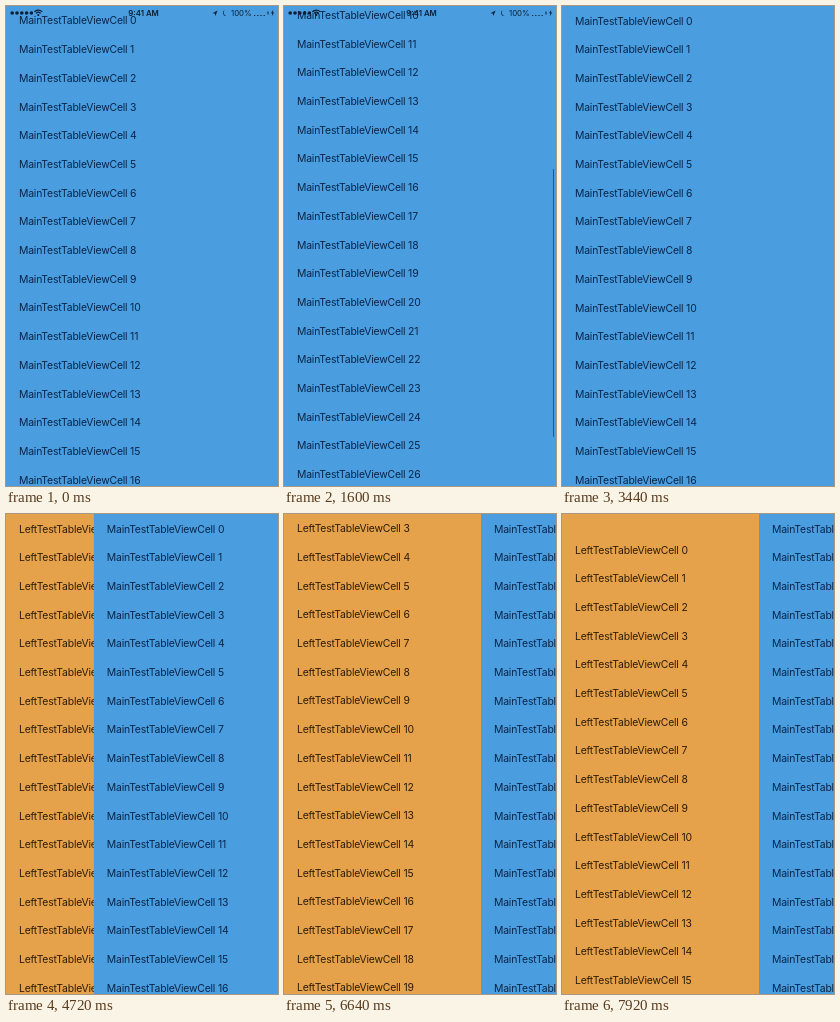
These frames come from a looping animation (272 px wide and 480 px high, 8 s). An HTML page with a canvas:

```html
<!DOCTYPE html>
<html lang="en">
<head>
<meta charset="utf-8">
<style>
html, body { margin: 0; width: 100%; height: 100%; overflow: hidden; }
canvas { display: block; width: 272px; height: 480px; }
</style>
</head>
<body>
<canvas id="stage"></canvas>
<script>
const W = 272, H = 480, ROW = 28.7, ROWS = 30, LOOP = 8000;
const FONT = 'Inter, Roboto, sans-serif';
const BLUE = '#4a9ddf', ORANGE = '#e6a24a', NAVY = '#08264a', BROWN = '#2e1d08', BLACK = '#0b1f35';
const canvas = document.getElementById('stage');
const ctx = canvas.getContext('2d');
const scale = window.devicePixelRatio || 1;
canvas.width = W * scale;
canvas.height = H * scale;

const progress = (t, start, length) => Math.max(0, Math.min(1, (t - start) / length));

// Smooth rise from 0 to 1
function ease(t, start, length) {
  const p = progress(t, start, length);
  return p * p * (3 - 2 * p);
}

// Smooth rise to 1 and back to 0
const pulse = (t, start, length) => Math.sin(Math.PI * progress(t, start, length)) ** 2;

// Fling to the bottom, spring back, return to the top, settle
const mainScroll = t =>
  386 * ease(t, 0, 880) - 5 * ease(t, 880, 300) - 382 * ease(t, 1320, 900) + ease(t, 2240, 160);

// Two trial pulls, then open for good
const drawer = t =>
  110 * pulse(t, 2560, 880) + 165 * pulse(t, 3560, 800) + 197 * ease(t, 4350, 800);

const leftScroll = t => 163 * pulse(t, 6200, 1700) - 21 * ease(t, 7400, 500);

function text(str, x, y, size, { weight = 400, align = 'left', spacing = 0 } = {}) {
  ctx.font = `${weight} ${size}px ${FONT}`;
  ctx.textAlign = align;
  ctx.letterSpacing = spacing + 'px';
  ctx.fillText(str, x, y);
}

function list(name, x, scroll, back, ink) {
  ctx.fillStyle = back;
  ctx.fillRect(x, 0, W, H);
  ctx.fillStyle = ink;
  for (let i = 0; i < ROWS; i++) {
    const y = i * ROW + 18.5 - scroll;
    if (y > -10 && y < H + 12) text(`${name}TestTableViewCell ${i}`, x + 13, y, 10.4, { spacing: -0.2 });
  }
}

function dot(x, y, r) {
  ctx.beginPath();
  ctx.arc(x, y, r, 0, 7);
  ctx.fill();
}

const shape = path => ctx.fill(new Path2D(path));

function scrollBar(scroll, alpha) {
  const max = ROWS * ROW - H;
  const over = Math.max(-scroll, scroll - max, 0);
  const length = H * H / (ROWS * ROW) - over;
  ctx.globalAlpha = alpha;
  ctx.fillStyle = NAVY;
  ctx.fillRect(269, progress(scroll, 0, max) * (H - length), 1, length);
}

function status(alpha) {
  ctx.globalAlpha = alpha;
  ctx.fillStyle = ctx.strokeStyle = BLACK;
  for (let i = 0; i < 5; i++) dot(6.2 + i * 4.8, 7, 1.8);
  ctx.lineWidth = 1.2;
  for (const r of [3.2, 5.4]) {
    ctx.beginPath();
    ctx.arc(32.3, 9.6, r, -Math.PI * 0.76, -Math.PI * 0.24);
    ctx.stroke();
  }
  dot(32.3, 9, 1.1);
  text('9:41 AM', 137.5, 9.8, 7.8, { weight: 600, align: 'center' });
  shape('M206.5 7.2L211.5 4.5L209.4 10L208.8 7.6Z');
  shape('M218.6 4A3.2 3.2 0 0 0 220.4 10A3.6 3.6 0 0 1 218.6 4Z');
  text('100%', 225, 9.8, 7.8);
  for (let i = 0; i < 4; i++) ctx.fillRect(248 + i * 3.2, 9, 1.2, 1);
  ctx.fillRect(261.5, 5.5, 1, 3);
  shape('M267.3 3.8L265 7.3H266.4L265.8 10.2L268.2 6.5H266.8Z');
}

function draw(now) {
  const t = now % LOOP;
  ctx.setTransform(scale, 0, 0, scale, 0, 0);
  ctx.globalAlpha = 1;
  const scroll = mainScroll(t);
  list('Left', 0, leftScroll(t), ORANGE, BROWN);
  list('Main', drawer(t), scroll, BLUE, NAVY);
  scrollBar(scroll, 0.6 * (ease(t, 0, 160) - ease(t, 2400, 300)));
  status(1 - ease(t, 2640, 160));
  requestAnimationFrame(draw);
}
requestAnimationFrame(draw);
</script>
</body>
</html>
```
